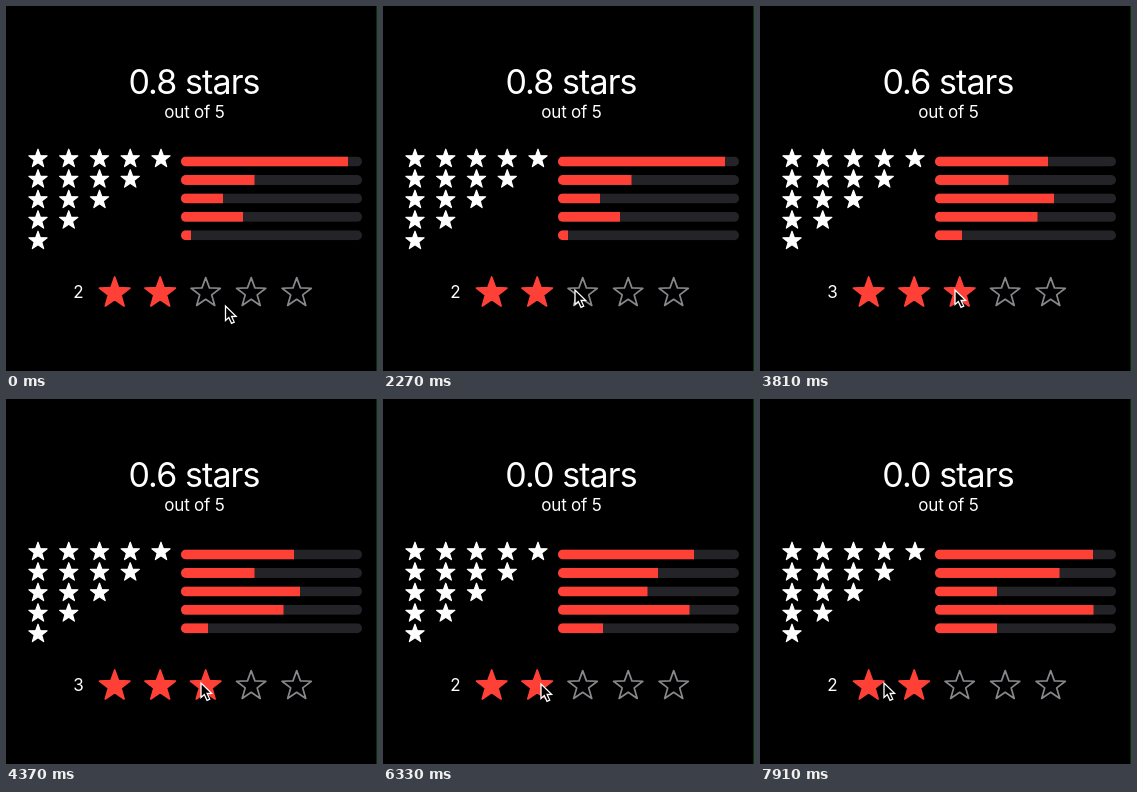
An HTML page with a canvas that plays this animation: 371 by 365 pixels, repeating every 8 s.

```html
<!DOCTYPE html>
<html lang="en">
<head>
<meta charset="utf-8">
<title>Star rating</title>
<style>
  html, body { margin: 0; width: 100%; height: 100%; overflow: hidden; background: #000; }
  canvas { display: block; width: 371px; height: 365px; }
</style>
</head>
<body>
<canvas id="stage"></canvas>
<script>
const W = 371, H = 365, LOOP = 8000;
const RED = '#ff4036', TRACK = '#242428', GRAY = '#88888c';
const canvas = document.getElementById('stage');
const ctx = canvas.getContext('2d');
const dpr = window.devicePixelRatio || 1;
canvas.width = W * dpr;
canvas.height = H * dpr;

// Right edge of each bar and the average shown above them
const states = [
  { at: 0, score: '0.8', ends: [342, 248.5, 217, 237, 185] },
  { at: 3800, score: '0.6', ends: [288, 248.5, 294, 277.5, 202] },
  { at: 6330, score: '0.0', ends: [311, 275, 264.5, 306.5, 220] },
  { at: 7500, score: '0.0', ends: [333, 299.5, 237, 333.5, 237] }
];
const ratings = [{ at: 0, n: 2 }, { at: 2900, n: 3 }, { at: 5330, n: 2 }];

// Pointer moves: start, end, target x and y
const home = [219.5, 300];
const moves = [
  [300, 1300, 192, 284],
  [2400, 2600, 195, 284],
  [4420, 4900, 158, 285],
  [7110, 7600, 124, 284]
];

const current = (list, t) => list.filter(s => s.at <= t).pop();
const ease = p => p * p * (3 - 2 * p);

function pointerAt(t) {
  let [x, y] = home;
  for (const [start, end, tx, ty] of moves) {
    const p = ease(Math.min(1, Math.max(0, (t - start) / (end - start))));
    x += (tx - x) * p;
    y += (ty - y) * p;
  }
  return [x, y];
}

function text(str, x, y, size, weight, spacing) {
  ctx.font = `${weight} ${size}px Inter, "Liberation Sans", sans-serif`;
  ctx.letterSpacing = spacing + 'px';
  ctx.textAlign = 'center';
  ctx.fillStyle = '#fff';
  ctx.fillText(str, x, y);
}

function star(x, y, r, color, filled, line) {
  ctx.beginPath();
  for (let i = 0; i < 10; i++) {
    const a = -Math.PI / 2 + i * Math.PI / 5;
    const d = i % 2 ? r * 0.41 : r;
    ctx.lineTo(x + d * Math.cos(a), y + d * Math.sin(a));
  }
  ctx.closePath();
  ctx.lineJoin = 'round';
  ctx.lineWidth = line;
  ctx.strokeStyle = ctx.fillStyle = color;
  if (filled) ctx.fill();
  ctx.stroke();
}

function bar(y, end) {
  ctx.save();
  ctx.beginPath();
  ctx.roundRect(175, y - 5, 181, 10, 5);
  ctx.clip();
  ctx.fillStyle = TRACK;
  ctx.fillRect(175, y - 5, 181, 10);
  ctx.fillStyle = RED;
  ctx.fillRect(175, y - 5, end - 175, 10);
  ctx.restore();
}

function pointer(x, y) {
  const shape = [[0, 0], [0, 14.5], [3.3, 11.5], [6, 17.3], [8.7, 16.1], [6.1, 10.5], [10.6, 10.4]];
  ctx.beginPath();
  for (const [dx, dy] of shape) ctx.lineTo(x + dx, y + dy);
  ctx.closePath();
  ctx.lineJoin = 'miter';
  ctx.lineWidth = 1.3;
  ctx.fillStyle = '#000';
  ctx.strokeStyle = '#fff';
  ctx.fill();
  ctx.stroke();
}

function draw(t) {
  const { score, ends } = current(states, t);
  const { n } = current(ratings, t);
  ctx.setTransform(dpr, 0, 0, dpr, 0, 0);
  ctx.fillStyle = '#000';
  ctx.fillRect(0, 0, W, H);
  ctx.fillStyle = '#003300';
  ctx.fillRect(W - 1, 0, 1, H);

  text(score + ' stars', 188, 88, 34, 400, -0.9);
  text('out of 5', 188.5, 112, 17, 400, -0.2);
  text(String(n), 72.5, 292, 17, 400, 0);

  for (let row = 0; row < 5; row++) {
    for (let col = 0; col < 5 - row; col++) {
      star(32 + col * 30.75, 152.8 + row * 20.5, 9.6, '#fff', true, 1.2);
    }
    bar(155.5 + row * 18.45, ends[row]);
  }
  for (let i = 0; i < 5; i++) {
    const on = i < n;
    star(108.7 + i * 45.5, 287, on ? 16 : 15.4, on ? RED : GRAY, on, 1.7);
  }
  pointer(...pointerAt(t));
}

const began = performance.now();
function tick() {
  draw((performance.now() - began) % LOOP);
  requestAnimationFrame(tick);
}
tick();
</script>
</body>
</html>
```
